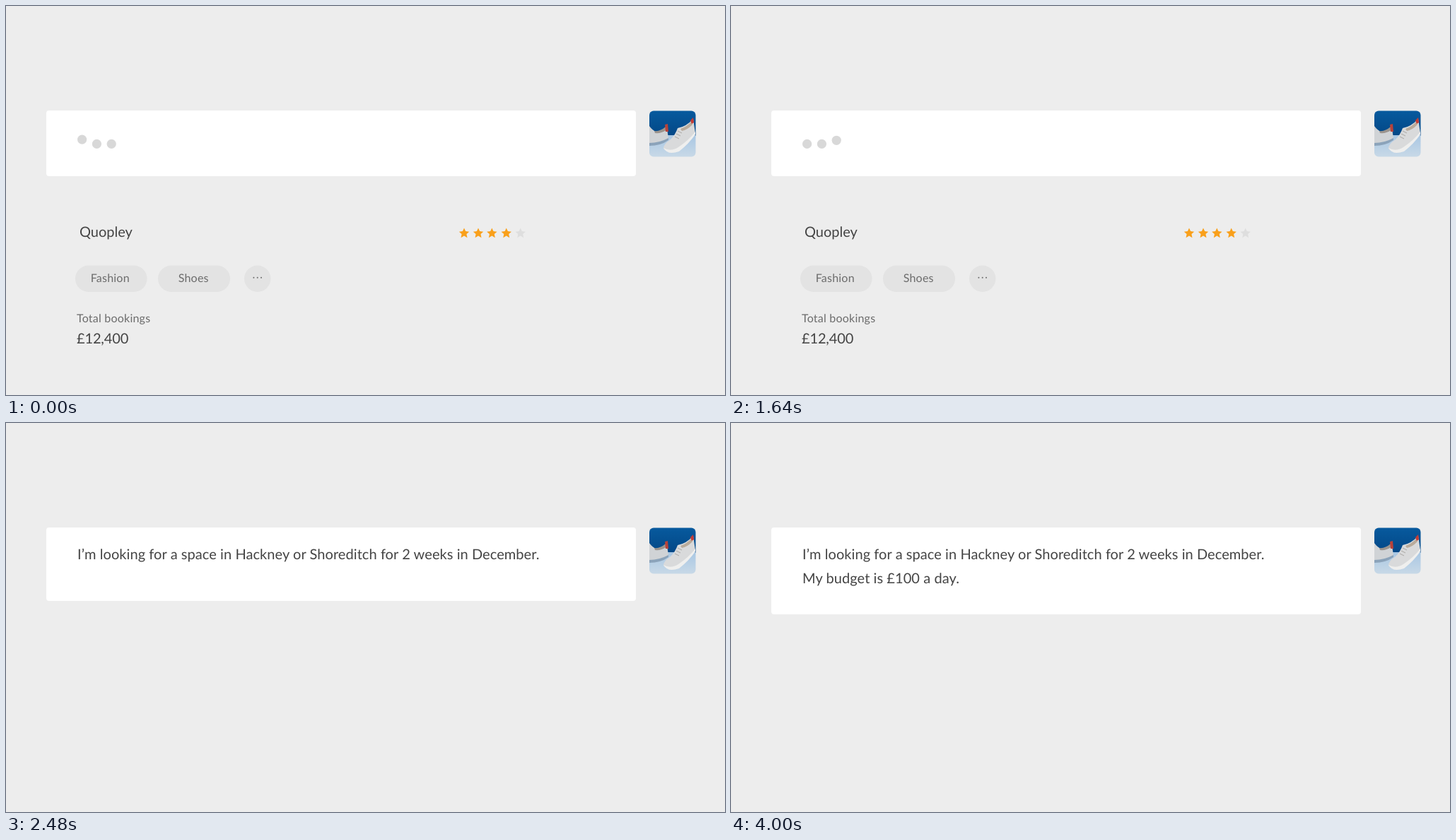
Write an HTML page that moves like this. It is 1017 by 551 pixels and loops after 4.04 s.

```html
<!DOCTYPE html>
<html lang="en">
<head>
<meta charset="utf-8">
<title>Space request</title>
<style>
  html, body { margin: 0; width: 100%; height: 100%; overflow: hidden; background: #ededed; }
  svg { display: block; width: 100vw; height: 100vh; }
  text { font-family: Lato, "Open Sans", sans-serif; font-size: 20px; fill: #444; white-space: pre; text-rendering: geometricPrecision; }
  .small { font-size: 16px; fill: #6c6c6c; letter-spacing: .22px; }
  .message { letter-spacing: .07px; }
  .chip { fill: #e3e3e3; }
</style>
</head>
<body>
<svg viewBox="0 0 1017 551">
  <defs>
    <linearGradient id="wall" x1="0" y1="0" x2="0" y2="1">
      <stop offset="0" stop-color="#075a9e"/><stop offset="1" stop-color="#034786"/>
    </linearGradient>
    <linearGradient id="floor" x1="0" y1="0" x2="0" y2="1">
      <stop offset="0" stop-color="#a9c7e3"/><stop offset="1" stop-color="#c8d9e7"/>
    </linearGradient>
    <clipPath id="frame"><rect x="910" y="148.5" width="65.5" height="65" rx="6"/></clipPath>
  </defs>

  <rect id="card" x="57" y="148" width="834" height="93" rx="4" fill="#fff"/>
  <g id="dots" fill="#d8d8d8"></g>

  <g clip-path="url(#frame)">
    <rect x="910" y="148" width="66" height="36" fill="url(#wall)"/>
    <rect x="910" y="183" width="66" height="31" fill="url(#floor)"/>
    <path d="M910 193 Q926 193 937 186 L937 190 Q926 198 910 198Z" fill="#8ba3ba"/>
    <path d="M910 170 Q914 176 921 179 Q930 178 935 174 L937 187 Q924 194 910 194Z" fill="#d0d3d6"/>
    <path d="M917 177 Q925 178 933 171 L934 176 Q926 181 918 180Z" fill="#9b948e"/>
    <path d="M932 168 L936 167 L937 178 L933 178Z" fill="#b8423a"/>
    <path d="M930 202 Q930 195 940 189 Q947 182 950 173 Q962 171 972 160 L975 180 Q967 193 952 205 Q938 211 930 202Z" fill="#d9dadb"/>
    <path d="M930 201 Q940 207 951 200 Q966 190 975 178 L975 182 Q966 195 952 206 Q936 212 930 201Z" fill="#efefee"/>
    <path d="M954 174 Q963 171 970 163 L971 168 Q963 176 956 177Z" fill="#b9ab9b"/>
    <path d="M946 185 l6 3 M948 181 l6 3 M950 177 l6 3" stroke="#a9a7a3" fill="none"/>
    <path d="M968 162 L972 158 L973 165 L970 167Z" fill="#c43b35"/>
  </g>

  <g id="details">
    <text x="104" y="327">Quopley</text>
    <g id="stars"></g>
    <rect class="chip" x="98" y="367.5" width="101.5" height="37.5" rx="18.75"/>
    <rect class="chip" x="215" y="367.5" width="102" height="37.5" rx="18.75"/>
    <circle class="chip" cx="355.7" cy="386.2" r="18.7"/>
    <text class="small" x="119.7" y="390.5">Fashion</text>
    <text class="small" x="243.7" y="390.5">Shoes</text>
    <g fill="#6c6c6c">
      <circle cx="350.4" cy="384.8" r="1"/><circle cx="355.7" cy="384.8" r="1"/><circle cx="361" cy="384.8" r="1"/>
    </g>
    <text class="small" x="100" y="448">Total bookings</text>
    <text x="100" y="478" letter-spacing="-.15">£12,400</text>
  </g>

  <text class="message" id="line1" x="101" y="192.5"></text>
  <text class="message" id="line2" x="101" y="227.3"></text>
</svg>
<script>
const LOOP = 4040, BOUNCE_PERIOD = 960;
const $ = id => document.getElementById(id);
const add = (parent, tag, attrs, text = "") => {
  const el = document.createElementNS("http://www.w3.org/2000/svg", tag);
  for (const key in attrs) el.setAttribute(key, attrs[key]);
  el.textContent = text;
  return parent.appendChild(el);
};
const progress = (t, from, to) => Math.min(1, Math.max(0, (t - from) / (to - from)));
const easeInOut = u => u < .5 ? 2 * u * u : 1 - 2 * (1 - u) ** 2;

const starPoints = cx => Array.from({ length: 10 }, (_, i) => {
  const r = i % 2 ? 3.6 : 7.6, a = (i / 5 - .5) * Math.PI;
  return `${(cx + r * Math.cos(a)).toFixed(2)},${(322 + r * Math.sin(a)).toFixed(2)}`;
}).join(" ");
[648, 668, 687.3, 707.7, 727.7].forEach((cx, i) =>
  add($("stars"), "polygon", { points: starPoints(cx), fill: i < 4 ? "#f9a01b" : "#dedede" }));

const dots = [107.6, 128.4, 149.2].map(cx => add($("dots"), "circle", { cx, r: 6.6 }));

const makeLine = (id, text, start, step) => text.split(" ").map((word, i) => ({
  el: add($(id), "tspan", {}, word + " "),
  start: start + i * step
}));
const words = [
  ...makeLine("line1", "I’m looking for a space in Hackney or Shoreditch for 2 weeks in December.", 2080, 26),
  ...makeLine("line2", "My budget is £100 a day.", 2482, 64)
];

// Each dot hops a third of a period after the previous one.
function lift(t, i) {
  let lag = (t - i * BOUNCE_PERIOD / 3) % BOUNCE_PERIOD;
  if (lag > BOUNCE_PERIOD / 2) lag -= BOUNCE_PERIOD;
  if (lag < -BOUNCE_PERIOD / 2) lag += BOUNCE_PERIOD;
  return Math.abs(lag) < 140 ? 6.3 * Math.cos(Math.PI * lag / 280) ** 2 : 0;
}

function draw(t) {
  dots.forEach((dot, i) => dot.setAttribute("cy", 195.4 - lift(t, i)));
  $("dots").setAttribute("opacity", 1 - progress(t, 2020, 2100));

  const leave = easeInOut(progress(t, 1690, 2085));
  $("details").setAttribute("transform", `translate(0 ${-24 * leave})`);
  $("details").setAttribute("opacity", 1 - leave);

  $("card").setAttribute("height", 93 + 30 * easeInOut(progress(t, 2265, 2765)));
  words.forEach(w => w.el.setAttribute("fill-opacity", progress(t, w.start, w.start + 60)));
}

let startTime;
function tick(now) {
  startTime ??= now;
  draw((now - startTime) % LOOP);
  requestAnimationFrame(tick);
}
draw(0);
requestAnimationFrame(tick);
</script>
</body>
</html>
```
